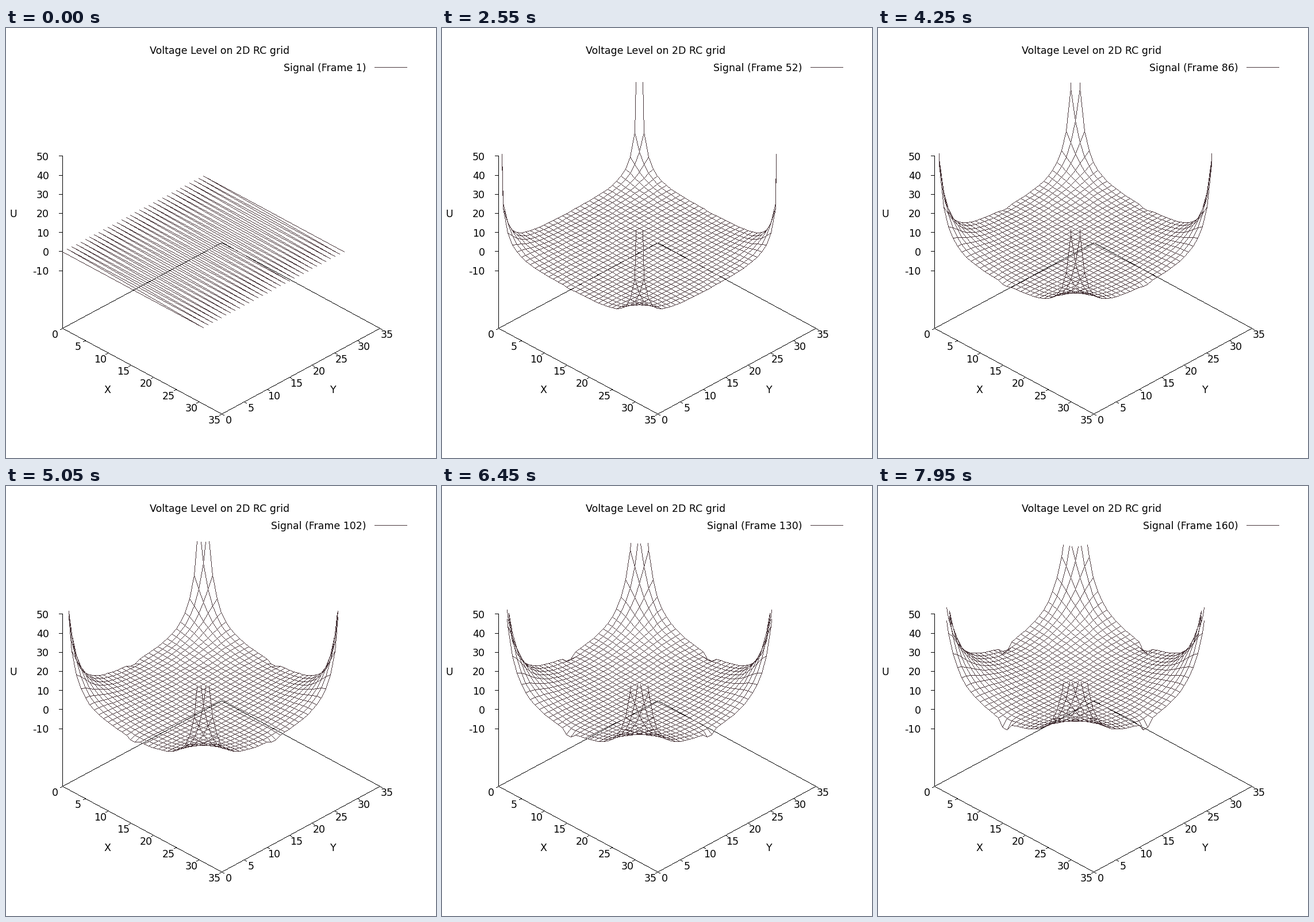
A matplotlib script that plays this animation: 748 by 748 pixels, repeating every 8000 ms.

```python
import numpy as np
import matplotlib.pyplot as plt
from matplotlib.animation import FuncAnimation

SIZE, FRAMES, STEP_MS = 748, 160, 50
N, TOP = 32, 50
INK, MESH = "black", "#4a383c"
FONT = 17.33

# field model: corner drive, spreading, and leaks at the edge middles
RAMP, DRIVE, SPREAD, POWER, LEAK = 3.1, 0.41, 0.245, 0.5, 0.1


def project(x, y, z):
    px = 98 + 7.9 * x + 7.9 * y
    py = 389.6 + 4.257 * (x - y) - 3.32 * z
    return np.stack([px, py], axis=-1)


def solve():
    k = np.arange(N)
    basis = np.cos(np.pi * np.outer(k + 0.5, k) / N) * np.sqrt(2 / N)
    basis[:, 0] /= np.sqrt(2)
    lam = 2 - 2 * np.cos(np.pi * k / N)
    decay = np.exp(-SPREAD * (lam[:, None] + lam[None, :]) ** POWER)
    corners = np.ix_([0, -1], [0, -1])
    mid = [N // 2 - 1, N // 2]
    u = np.zeros((N, N))
    fields = [u.copy()]
    for n in range(1, FRAMES):
        u = basis @ (decay * (basis.T @ u @ basis)) @ basis.T
        u[corners] += DRIVE * n
        for edge in (0, -1):
            u[edge, mid] *= 1 - LEAK
            u[mid, edge] *= 1 - LEAK
        shown = u.copy()
        shown[corners] = RAMP * n
        fields.append(shown)
    return fields


def clipped(p, q):
    """Keep the parts of the segments p-q that lie below the top plane."""
    low = np.minimum(p[:, 2], q[:, 2]) < TOP
    p, q = p[low], q[low]

    def cut(a, b):
        over = a[:, 2] > TOP
        f = np.where(over, (a[:, 2] - TOP) / np.where(over, a[:, 2] - b[:, 2], 1), 0)
        return a + f[:, None] * (b - a)

    a, b = cut(p, q), cut(q, p)
    return project(*a.T), project(*b.T)


def raster(a, b):
    """Whole-pixel points along the segments a-b, one pixel wide."""
    a = np.rint(a)
    d = np.rint(b) - a
    count = np.abs(d).max(axis=1).astype(int) + 1
    i = np.arange(count.sum()) - np.repeat(np.cumsum(count) - count, count)
    f = i / np.repeat(np.maximum(count - 1, 1), count)
    pts = np.repeat(a, count, axis=0) + f[:, None] * np.repeat(d, count, axis=0)
    return np.floor(pts + 0.5).T


GX, GY = np.meshgrid(np.arange(N), np.arange(N), indexing="ij")
FIELDS = solve()


def mesh(n):
    if n == 0:
        # the flat sheet is one continuous zigzag along the row ends
        path = project(GX[[0, -1]].T.ravel(), GY[[0, -1]].T.ravel(), 0)
        return path[:-1], path[1:]
    p = np.stack([GX, GY, FIELDS[n]], axis=-1).astype(float)
    start = np.concatenate([p[:-1].reshape(-1, 3), p[:, :-1].reshape(-1, 3)])
    end = np.concatenate([p[1:].reshape(-1, 3), p[:, 1:].reshape(-1, 3)])
    return clipped(start, end)


plt.rcParams["font.family"] = "DejaVu Sans"
fig = plt.figure(figsize=(SIZE / 72, SIZE / 72), dpi=72, facecolor="white")
ax = fig.add_axes([0, 0, 1, 1])
ax.set_xlim(0, SIZE)
ax.set_ylim(SIZE, 0)
ax.axis("off")


def dots(xs, ys, color, z=2):
    return ax.plot(xs, ys, ",", color=color, zorder=z)[0]


def line(points, color=INK):
    points = np.array(points, float)
    dots(*raster(points[:-1], points[1:]), color)


def label(x, y, text, ha="center"):
    return ax.text(x, y + 6.2, text, size=FONT, color=INK, ha=ha, va="baseline")


line([(98, 223), (98, 523), (375, 374), (650, 523), (375, 672), (98, 523)])
for v in range(0, 36, 5):
    x, y = 98 + 7.91 * v, 523 + 4.257 * v
    line([(x, y), (x - 4, y + 2)])
    label(x - 12.5, y + 10, str(v))
    x, y = 375 + 7.87 * v, 672 - 4.257 * v
    line([(x, y), (x + 4, y + 2)])
    label(x + 12, y + 10, str(v))
for v in range(-10, 51, 10):
    y = 389.4 - 3.32 * v
    line([(92, y), (98, y)])
    label(75, y + 0.2, str(v), "right")
label(13, 323, "U")
label(176, 629, "X")
label(569, 629, "Y")
label(372, 39, "Voltage Level on 2D RC grid")
line([(641, 69), (697, 69)], MESH)
legend = label(626.5, 69, "", "right")
sheet = dots([], [], MESH, 3)


def update(n):
    sheet.set_data(*raster(*mesh(n)))
    legend.set_text(f"Signal (Frame {n + 1})")
    return sheet, legend


anim = FuncAnimation(fig, update, frames=FRAMES, interval=STEP_MS,
                     repeat=True, repeat_delay=0, blit=False)
plt.show()
```
